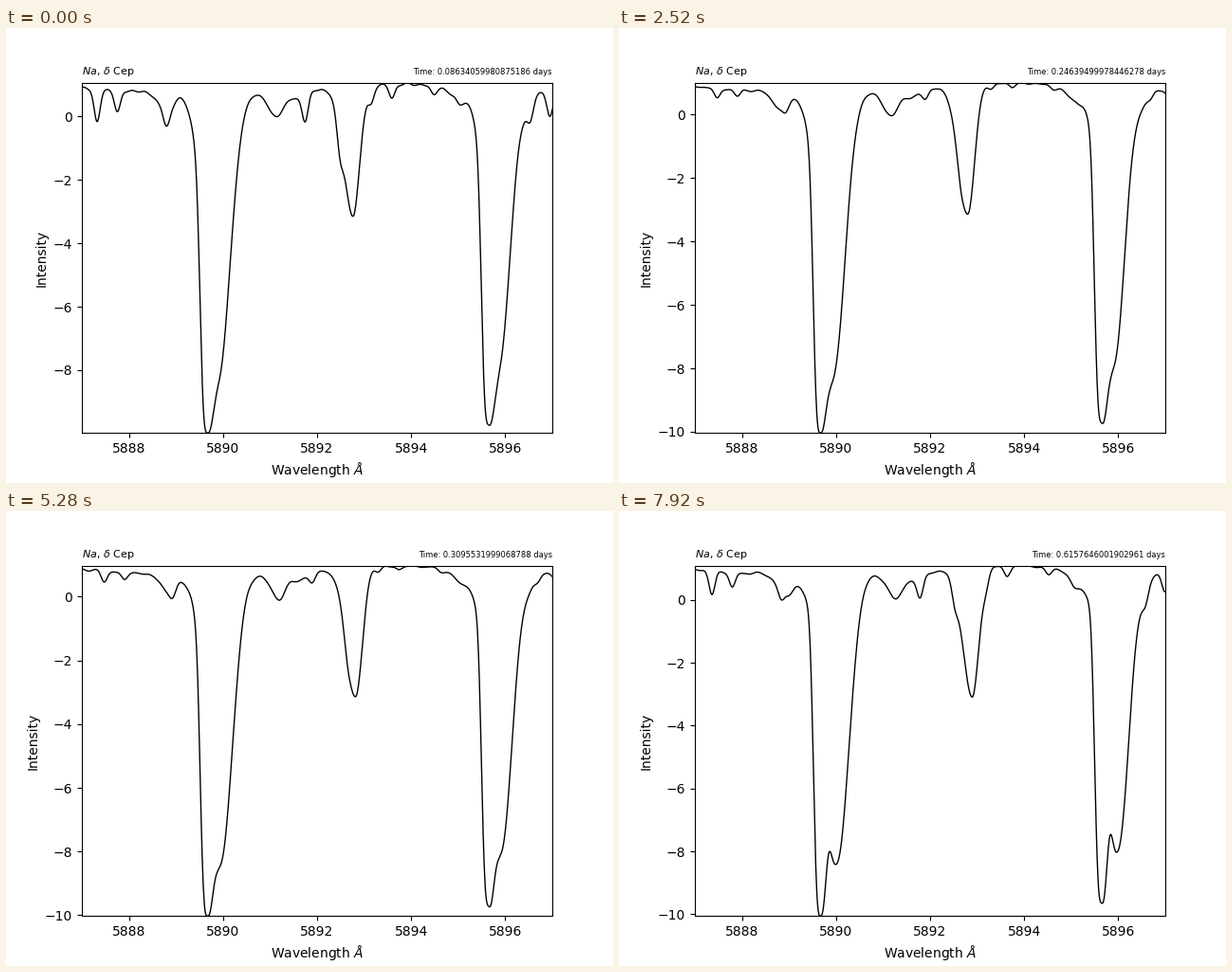
A matplotlib script that plays this animation: 640x480 px, repeating every 8000 ms.

```python
import numpy as np
import matplotlib.pyplot as plt
from matplotlib.animation import FuncAnimation

TICK = 40          # ms per animation frame
HOLD = 3           # animation frames per spectrum
FRAMES = 200
STEP = 0.0033      # days between exposures

WAVE = np.linspace(5887, 5897, 1001)

# first spectrum, telluric shift, telluric strength
NIGHTS = [(0, 0.0, 1.0), (5, 0.15, 0.32), (48, 0.0, 0.4), (59, 0.04, 0.7)]

# spectrum, time, lowest and highest intensity, stellar shift
KEYS = np.array([
    (0, 0.08634059980875186, -9.985, 1.074, 0.0),
    (12, 0.21128100016438278, -10.066, 0.951, 0.024),
    (21, 0.24639499978446278, -10.036, 1.013, 0.036),
    (30, 0.26375970010929617, -10.003, 0.993, 0.044),
    (44, 0.3095531999068788, -10.022, 0.979, 0.052),
    (52, 0.42442250002021176, -10.135, 0.925, 0.03),
    (66, 0.6157646001902961, -10.057, 1.092, 0.131),
])

# sodium doublet: wavelength, interstellar depth, stellar depth, width factor
SODIUM = [(5889.67, 0.99, 0.83, 1.0), (5895.645, 0.94, 0.79, 0.9)]

# centre, depth, left width, right width
STELLAR = [(5888.835, 0.6, 0.28, 0.16), (5891.14, 0.8, 0.24, 0.2),
           (5891.56, 0.25, 0.2, 0.2), (5892.766, 4.0, 0.28, 0.2),
           (5894.98, 0.25, 0.25, 0.2), (5896.43, 0.3, 0.2, 0.15)]

# centre, depth
TELLURIC = [(5887.323, 1.07), (5887.756, 0.7), (5888.795, 0.5),
            (5891.748, 0.85), (5892.484, 0.75), (5893.149, 0.5),
            (5893.593, 0.45), (5894.48, 0.28), (5895.02, 0.15),
            (5896.536, 0.55), (5896.95, 0.75)]


def bell(centre, left, right=None, power=2):
    d = WAVE - centre
    return np.exp(-(abs(d) / np.where(d < 0, left, right or left)) ** power)


def night_of(k):
    return max(n for n, night in enumerate(NIGHTS) if night[0] <= k)


def keyed(k):
    """Time, low, high and stellar shift, joined only within one night."""
    n = night_of(k)
    keys = np.array([key for key in KEYS if night_of(key[0]) == n])
    inside = np.clip(k, keys[0, 0], keys[-1, 0])
    time, low, high, shift = (float(np.interp(inside, keys[:, 0], col))
                              for col in keys.T[1:])
    return time + STEP * float(k - inside), low, high, shift


def sodium(shift):
    flux = 1
    for centre, cloud, star, width in SODIUM:
        flux = flux * (1 - cloud * bell(centre, 0.167, power=3))
        flux *= 1 - star * bell(centre + 0.192 + shift, 0.323 * width,
                                0.375 * width, 2.2)
        flux *= 1 - 0.12 * bell(centre, 0.4, 0.6)
    return flux


def spectrum(k):
    time, low, high, shift = keyed(k)
    _, air_shift, air = NIGHTS[night_of(k)]
    rng = np.random.default_rng(k)

    y = 0.81 + 0.24 * bell(5893.75, 1.4) + 0.12 * bell(5887, 0.8)
    y -= 10.7 * (1 - sodium(shift))
    for centre, depth, left, right in STELLAR:
        y -= depth * bell(centre + shift, left, right)
    for centre, depth in TELLURIC:
        y -= air * depth * bell(centre + air_shift, 0.09)
    for period in rng.uniform(0.25, 0.6, 4):
        y += 0.012 * np.sin(2 * np.pi * (WAVE / period + rng.random()))

    # exposures away from the keys scatter a little in depth
    loose = min(1, abs(KEYS[:, 0] - k).min() / 3)
    low += 0.015 * loose * rng.normal()
    return time, low + (high - low) * (y - y.min()) / np.ptp(y)


fig, ax = plt.subplots(figsize=(6.4, 4.8), dpi=100)
line, = ax.plot([], [], color="black", lw=1)
ax.set_xlim(WAVE[0], WAVE[-1])
ax.set_xlabel(r"Wavelength $\AA$")
ax.set_ylabel("Intensity")
ax.set_title(r"$Na$, $\delta$ Cep", loc="left", fontsize=8)
clock = ax.set_title("", loc="right", fontsize=6)


def update(i):
    time, y = spectrum(i // HOLD)
    line.set_data(WAVE, y)
    ax.set_ylim(y.min(), y.max())
    clock.set_text(f"Time: {time} days")
    return line, clock


anim = FuncAnimation(fig, update, frames=FRAMES, interval=TICK, repeat=True,
                     repeat_delay=0, init_func=lambda: update(0))
plt.show()
```
